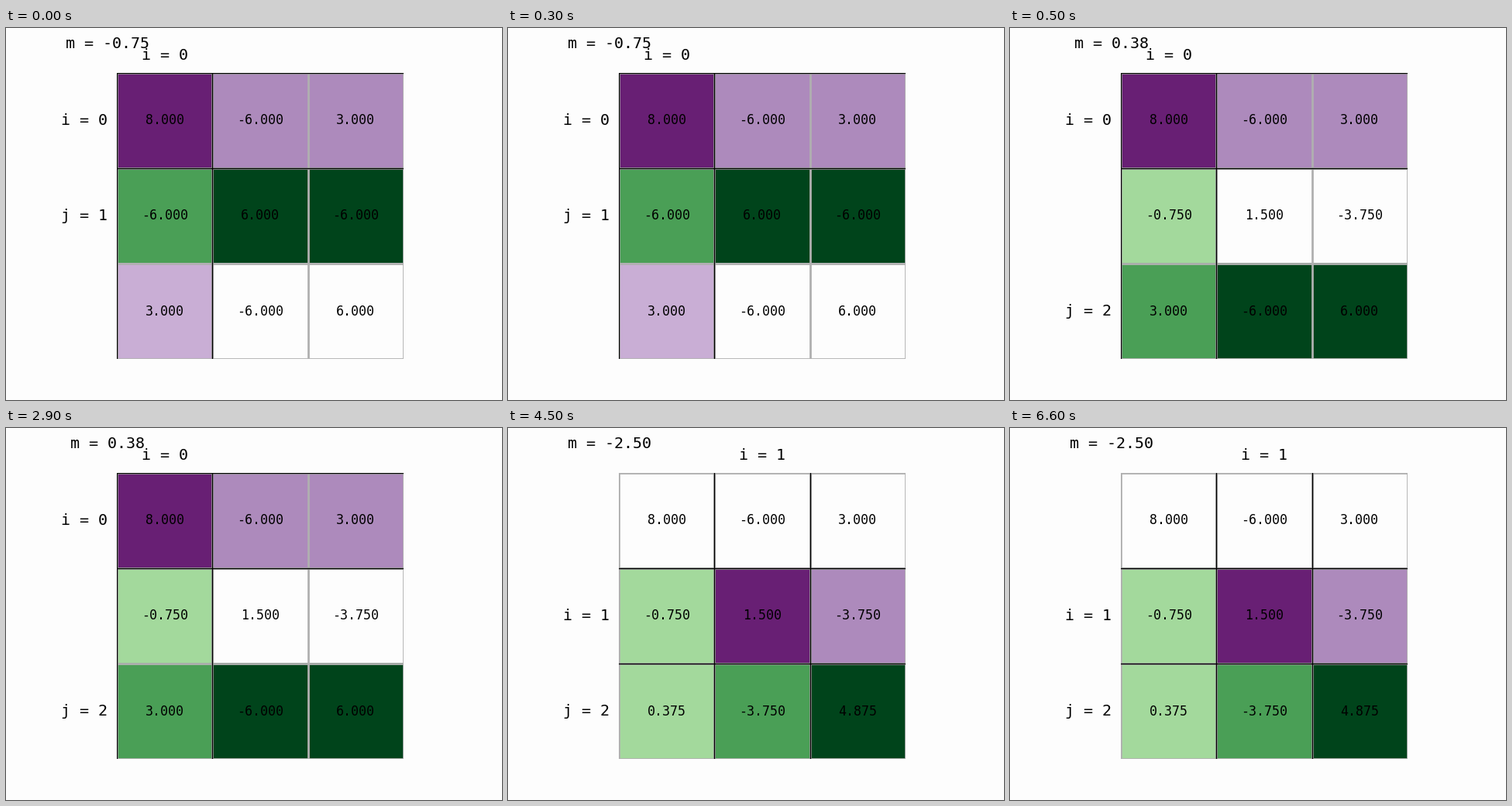
A matplotlib script that plays this animation: 640x480 px, repeating every 8000 ms.

```python
import numpy as np
import matplotlib.pyplot as plt
from matplotlib.animation import FuncAnimation
from matplotlib.colors import to_rgb

STEP_MS = 500
FRAMES = 16
STARTS = (0, 1, 9)          # frame at which each elimination step begins
PAPER = "#fdfdfd"
PIVOT, PIVOT_ROW, PENDING = "#681f74", "#ad8abc", "#c9aed5"
FACTOR, TARGET_ROW, DONE = "#4a9f56", "#00441b", "#a3d99c"

plt.rcParams["font.family"] = "DejaVu Sans Mono"


def lu_steps(a):
    """List (i, j, m, matrix before the step) for an in-place LU."""
    a, steps, n = a.copy(), [], len(a)
    for i in range(n - 1):
        for j in range(i + 1, n):
            m = a[j, i] / a[i, i]
            steps.append((i, j, m, a.copy()))
            a[j, i + 1:] -= m * a[i, i + 1:]
            a[j, i] = m
    return steps


def cell_colors(i, j, n):
    img = np.full((n, n, 3), to_rgb(PAPER))
    for c in range(i):
        img[c + 1:, c] = to_rgb(DONE)
    img[i, i] = to_rgb(PIVOT)
    img[i, i + 1:] = to_rgb(PIVOT_ROW)
    img[i + 1:j, i] = to_rgb(DONE)
    img[j, i] = to_rgb(FACTOR)
    img[j, i + 1:] = to_rgb(TARGET_ROW)
    img[j + 1:, i] = to_rgb(PENDING)
    return img


matrix = np.array([[8, -6, 3], [-6, 6, -6], [3, -6, 6]], float)
N = len(matrix)
steps = lu_steps(matrix)

fig, ax = plt.subplots(figsize=(6.4, 4.8), dpi=100, facecolor=PAPER)
image = ax.imshow(np.ones((N, N, 3)), interpolation="nearest")
ax.set_xticks([])
ax.set_yticks([])
ax.set_facecolor(PAPER)
for spine in ax.spines.values():
    spine.set_visible(False)

for k in range(N + 1):
    ax.axhline(k - 0.5, color="#b0b0b0", lw=2, zorder=2)
    ax.axvline(k - 0.5, color="#b0b0b0", lw=2, zorder=2)

row_lines = [ax.axhline(0, color="black", lw=1, zorder=3) for _ in range(2)]
col_lines = [ax.axvline(0, color="black", lw=1, zorder=3) for _ in range(2)]


def label(x, y, ha="center", va="center", size=14.4):
    return ax.text(x, y, "", ha=ha, va=va, fontsize=size, color="black")


cells = [[label(c, r, size=12) for c in range(N)] for r in range(N)]
factor = label(-0.6, -0.8)
col_label = label(0, -0.6, va="bottom")
pivot_label = label(-0.6, 0, ha="right")
target_label = label(-0.6, 1, ha="right")


def draw(frame):
    i, j, m, a = steps[sum(frame >= s for s in STARTS) - 1]
    image.set_data(cell_colors(i, j, N))
    for r in range(N):
        for c in range(N):
            cells[r][c].set_text(f"{a[r, c]:.3f}")
    for k in range(2):
        edge = i - 0.5 + k
        row_lines[k].set_ydata([edge, edge])
        col_lines[k].set_xdata([edge, edge])
    factor.set_text(f"m = {m:.2f}")
    col_label.set_text(f"i = {i}")
    col_label.set_x(i)
    pivot_label.set_text(f"i = {i}")
    pivot_label.set_y(i)
    target_label.set_text(f"j = {j}")
    target_label.set_y(j)
    return []


anim = FuncAnimation(fig, draw, frames=FRAMES, init_func=lambda: draw(0),
                     interval=STEP_MS, repeat=True, repeat_delay=0, blit=False)
plt.show()
```
